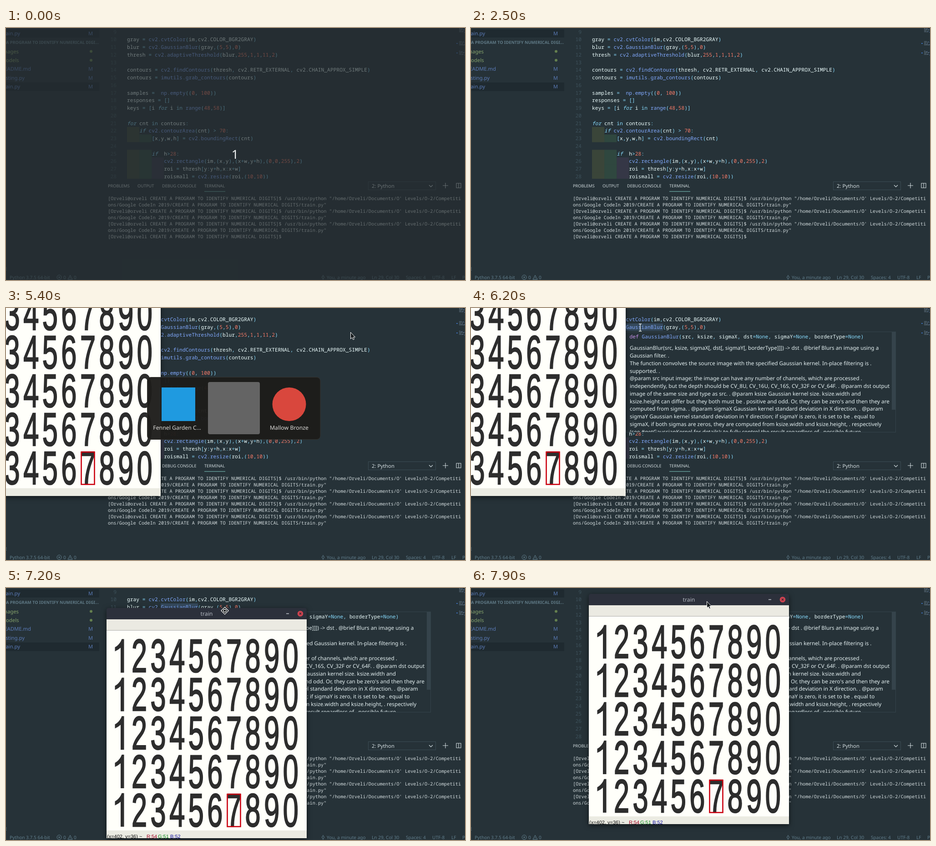
An HTML page for the animation above (8000 ms loop, 1009 by 555 pixels).

```html
<!DOCTYPE html>
<html lang="en">
<head>
<meta charset="utf-8">
<title>Digit training session</title>
<style>
html, body { margin: 0; width: 100%; height: 100%; overflow: hidden; background: #263238; }
svg { display: block; font-family: "Noto Sans", sans-serif; text-rendering: geometricPrecision; }
text { white-space: pre; }
.mono { font-family: "Noto Sans Mono", monospace; }
.arial { font-family: "Liberation Sans", Arial, sans-serif; }
#win { filter: drop-shadow(0 3px 6px rgba(0, 0, 0, .55)); }
</style>
</head>
<body>
<svg id="stage" width="1009" height="555" viewBox="0 0 1009 555"></svg>
<script>
const BG = '#263238', WHITE = '#eeffff', CYAN = '#89ddff', BLUE = '#82aaff', DIM = '#607d8b';

const text = (x, y, s, fill, size, attrs = '') =>
  `<text x="${x}" y="${y}" fill="${fill}" font-size="${size}" ${attrs}>${s}</text>`;
const rect = (x, y, w, h, fill, attrs = '') =>
  `<rect x="${x}" y="${y}" width="${w}" height="${h}" fill="${fill}" ${attrs}/>`;
const line = (d, stroke, width = 1) =>
  `<path d="${d}" fill="none" stroke="${stroke}" stroke-width="${width}"/>`;
const group = (id, content) => `<g id="${id}">${content}</g>`;
const END = 'text-anchor="end"', MID = 'text-anchor="middle"';

// Syntax colouring for one line of Python
const highlight = s => s.replace(/[\w.]+|[^\w\s.]+/g, (word, at) => {
  let fill = WHITE, style = '';
  if (/^(for|if)$/.test(word)) { fill = CYAN; style = 'font-style="italic"'; }
  else if (word === 'def') fill = '#c792ea';
  else if (/^(in|None)$/.test(word) || /^\W/.test(word)) fill = CYAN;
  else if (/^\d+$/.test(word)) fill = '#f47a68';
  else if (s[at + word.length] === '(') fill = BLUE;
  return `<tspan fill="${fill}" ${style}>${word}</tspan>`;
});
const codeText = (x, y, s) => text(x, y, highlight(s), WHITE, 11.29, 'class="mono"');

const FIRST_LINE = 9;
const source = `
gray = cv2.cvtColor(im,cv2.COLOR_BGR2GRAY)
blur = cv2.GaussianBlur(gray,(5,5),0)
thresh = cv2.adaptiveThreshold(blur,255,1,1,11,2)

contours = cv2.findContours(thresh, cv2.RETR_EXTERNAL, cv2.CHAIN_APPROX_SIMPLE)
contours = imutils.grab_contours(contours)

samples =  np.empty((0, 100))
responses = []
keys = [i for i in range(48,58)]

for cnt in contours:
    if cv2.contourArea(cnt) > 70:
        [x,y,w,h] = cv2.boundingRect(cnt)

        if  h>28:
            cv2.rectangle(im,(x,y),(x+w,y+h),(0,0,255),2)
            roi = thresh[y:y+h,x:x+w]
            roismall = cv2.resize(roi,(10,10))`.split('\n');

function editor() {
  const tints = ['rgba(255,255,64,.09)', 'rgba(127,255,127,.1)', 'rgba(255,127,255,.07)'];
  let out = group('mark', rect(340, 34, 82, 16, 'rgba(110,160,230,.2)'));
  source.forEach((s, i) => {
    const y = 12.6 + i * 16.75, levels = s.search(/\S|$/) / 4;
    for (let k = 0; k < levels; k++) out += rect(266 + k * 27.1, y - 12.4, 27.1, 16.75, tints[k]);
    out += text(243, y, FIRST_LINE + i, '#3d515b', 11.29, 'class="mono" ' + END) + codeText(266, y, s);
  });
  // Minimap
  for (const top of [0, 29, 50])
    for (let y = top; y < top + 10; y += 2) {
      const w = 3 + y * 37 % 10;
      out += rect(996, y, w, 1, 'rgba(165,190,210,.4)') + rect(998 + w, y + 1, 3, 1, 'rgba(130,170,255,.4)');
    }
  return out + rect(990, 33, 3, 2, '#3b6bb0') + rect(990, 54, 3, 2, '#3b6bb0');
}

function sidebar() {
  const blue = '#5a7ab5', green = '#84a16b';
  const entries = [['train.py', 31, 12, blue], ['images', 28, 51.5, green], ['models', 28.5, 71, green],
    ['README.md', 55, 90, blue], ['testing.py', 41, 110, blue], ['train.py', 31, 129, blue]];
  let out = rect(0, 3, 205, 18, '#1f2a30') + rect(0, 120, 205, 19, '#1f2a30') +
    text(204, 35, 'CREATE A PROGRAM TO IDENTIFY NUMERICAL DIGI...', '#607a86', 9.2, 'font-weight="700" ' + END) +
    text(2, 534, 'OUTLINE', '#607a86', 9.2, 'font-weight="700" ' + END);
  for (const [name, x, y, fill] of entries)
    out += text(x, y + 4.2, name, fill, 11.3, END) + (fill === blue
      ? text(186, y + 4.2, 'M', fill, 11, MID)
      : `<circle cx="187" cy="${y}" r="3" fill="#65804f"/>`);
  return out;
}

function panel() {
  const tabs = [['PROBLEMS', 224], ['OUTPUT', 289], ['DEBUG CONSOLE', 343], ['TERMINAL', 436]];
  const row = (i, s) => text(224, 378.7 + i * 14.1, s, '#d3dcde', 10.27, 'class="mono"');
  const prompt = '[Orveli@orveli CREATE A PROGRAM TO IDENTIFY NUMERICAL DIGITS]$ ';
  const command = `/usr/bin/python "/home/Orveli/Documents/O' Levels/O-2/Competiti`;
  const rest = 'ons/Google CodeIn 2019/CREATE A PROGRAM TO IDENTIFY NUMERICAL DIGITS/train.py"';
  const run = i => row(i, prompt + command) + row(i + 1, rest);
  return rect(206, 332, 803, 223, BG) +
    tabs.map(([s, x]) => text(x, 350.8, s, '#cfd8dc', 9.2)).join('') +
    rect(436, 359.5, 46, 1, '#80cbc4') +
    rect(796.5, 338.5, 148, 18, 'none', 'stroke="#3b4b54"') +
    text(804, 351.6, '2: Python', '#d5dfe2', 11.3) +
    line('M930 346l4 4 4-4M960 347h12M966 341v12M990 342h10v10h-10zM995 342v10', '#d5dfe2', 1.1) +
    run(0) + run(2) + run(4) + group('idle', row(6, prompt)) + group('started', run(6));
}

function statusBar() {
  const items = [['Python 3.7.5 64-bit', 8], ['0', 126], ['0', 149], ['You, a minute ago', 705],
    ['Ln 29, Col 30', 804], ['Spaces: 4', 879], ['UTF-8', 937], ['LF', 979], ['Python', 1003]];
  return items.map(([s, x]) => text(x, 553, s, DIM, 10.1)).join('') +
    line('M112 549a5 5 0 1 0 10 0a5 5 0 1 0-10 0M115 547l4 4M119 547l-4 4M141 544.5l5 9h-10zM141 548v3', DIM) +
    line('M697 544v2.5M697 551.5v3M694.5 549a2.5 2.5 0 1 0 5 0a2.5 2.5 0 1 0-5 0', DIM);
}

function tooltip() {
  const doc = `GaussianBlur(src, ksize, sigmaX[, dst[, sigmaY[, borderType]]]) -> dst . @brief Blurs an image using a
Gaussian filter. .
The function convolves the source image with the specified Gaussian kernel. In-place filtering is .
supported. .
@param src input image; the image can have any number of channels, which are processed .
independently, but the depth should be CV_8U, CV_16U, CV_16S, CV_32F or CV_64F. . @param dst output
image of the same size and type as src. . @param ksize Gaussian kernel size. ksize.width and
ksize.height can differ but they both must be . positive and odd. Or, they can be zero's and then they are
computed from sigma. . @param sigmaX Gaussian kernel standard deviation in X direction. . @param
sigmaY Gaussian kernel standard deviation in Y direction; if sigmaY is zero, it is set to be . equal to
sigmaX, if both sigmas are zeros, they are computed from ksize.width and ksize.height, . respectively
(see #getGaussianKernel for details); to fully control the result regardless of . possible future`.split('\n');
  return rect(340.5, 52.5, 593, 221, BG, 'stroke="#34434b"') + rect(925, 53, 8, 171, '#35434b') +
    codeText(348.5, 67, 'def GaussianBlur(src, ksize, sigmaX, dst=None, sigmaY=None, borderType=None)') +
    '<g clip-path="url(#tipClip)">' +
    doc.map((s, i) => text(349, 92.3 + i * 16.75, s, '#e6f2f3', 11.76)).join('') + '</g>';
}

// The picture shows Arial-like digits squeezed sideways; its "1" has no foot
function digitSheet() {
  const SQUASH = .595;
  let out = '';
  for (let r = 0; r < 5; r++) {
    const y = 141.3 + 84.8 * r;
    out += `<path transform="translate(18.5 ${y + 1.3})" d="M20 0V-74h-5C12-66 7-60 0-56v9q7-3 12.5-8V0Z"/>`;
    [...'234567890'].forEach((d, i) => {
      out += `<text transform="translate(${72 + 41.6 * i} ${y}) scale(${SQUASH} 1)">${d}</text>`;
    });
  }
  return `<g class="arial" font-size="103" ${MID} fill="#2d2d2d">` +
    out.replaceAll('<text', '<text stroke="#2d2d2d" stroke-width="2.6"') + '</g>';
}

function trainWindow() {
  const readout = [['(x=402, y=36) ~', 1, '#111'], ['R:54', 88, '#a00020'], ['G:51', 113, '#0a8a18'], ['B:52', 140, '#1212a0']];
  return '<g clip-path="url(#winClip)">' +
    rect(0, 0, 440, 507, '#2c303b') + text(220, 17.2, 'train', '#b4b9c2', 12.3, MID) +
    line('M395 12.5h6', '#c5c9d0', 1.5) +
    '<circle cx="426" cy="12.5" r="6.3" fill="#cc4350"/>' + line('M424 10.5l4 4M428 10.5l-4 4', '#3a2530', 1.3) +
    rect(0, 25, 440, 24, '#ebeae2') + rect(0, 48.5, 440, 1, '#cfcec8') +
    rect(0, 49.5, 440, 440.5, '#fffffa') + rect(0, 490, 440, 17, '#ebebe2') + digitSheet() +
    rect(265.5, 410.2, 29, 71.3, 'none', 'stroke="#cb0010" stroke-width="2.6"') +
    group('readout', readout.map(([s, x, c]) => text(x, 506.5, s, c, 11, 'class="arial"')).join('')) + '</g>';
}

function switcher() {
  return rect(310.5, 152.5, 380.5, 137, 'rgba(30,29,27,.96)', 'rx="8" stroke="#34332f"') +
    rect(444, 163, 114, 115, '#646464', 'rx="4"') +
    rect(342, 175, 74, 74, '#1f9ae0') + '<circle cx="622.5" cy="212" r="37" fill="#d9473d"/>' +
    text(376, 267.5, 'Fennel Garden C...', '#deddda', 12.3, MID) + text(622.5, 267.5, 'Mallow Bronze', '#deddda', 12.3, MID);
}

const pointers =
  group('beam', line('M-3-8h2l1 1 1-1h2M0-7V7M-3 8h2l1-1 1 1h2', '#e8eeee', 1.3)) +
  group('arrow', '<path d="M0 0V14.5L3.3 11.5 5.5 16.3 8 15.2 5.8 10.6H10Z" fill="#15191b" stroke="#fff"/>') +
  group('move', '<g fill="#15191b" stroke="#fff" stroke-width="1.2"><path d="M0-8L8 0 0 8-8 0Z"/><circle r="3.2"/></g>');

document.getElementById('stage').innerHTML =
  `<defs><clipPath id="tipClip">${rect(341, 53, 584, 220, '#000')}</clipPath>
   <clipPath id="winClip"><path d="M0 507V5q0-5 5-5H435q5 0 5 5V507Z"/></clipPath></defs>` +
  rect(0, 0, 1009, 555, BG) + editor() + sidebar() + panel() + statusBar() +
  group('tip', tooltip()) + group('win', trainWindow()) + group('switch', switcher()) + pointers +
  group('countdown', rect(0, 0, 1009, 555, 'rgba(37,43,47,.63)') + text(503.5, 288, '1', '#f2f4f4', 27, MID));

const el = id => document.getElementById(id);
const show = (id, on) => { el(id).style.display = on ? '' : 'none'; };
const place = (id, [x, y]) => el(id).setAttribute('transform', `translate(${x} ${y})`);
const at = (path, i) => path[Math.max(0, Math.min(path.length - 1, i))];

const beamIn = [[865.5, 70.5], [850, 72], [812, 69], [775, 59], [758, 54.5]];
const beamBack = [[742, 58], [640, 53], [500, 48], [405, 44], [372, 43]];
const drag = [[-100, -93], [140, -13], [190, 20], [221, 44], [238, 54], [243, 52], [248, 40], [254, 26], [258, 16], [259, 13]];

function draw(now) {
  const step = Math.floor(now % 8000 / 100);
  show('countdown', step < 1);
  show('idle', step < 27);
  show('started', step >= 27);
  show('switch', step >= 50 && step < 55);
  show('mark', step >= 62);
  show('tip', step >= 62);
  show('win', step >= 54);
  show('readout', step >= 63);

  const win = at(drag, step - 69);
  place('win', win);

  show('beam', step >= 34 && step < 48 || step >= 55 && step < 63);
  place('beam', step < 48 ? at(beamIn, step - 35) : at(beamBack, step - 55));
  show('arrow', step >= 48 && step < 55 || step === 79);
  place('arrow', step < 55 ? [757.5, 53.5] : [518.5, 29.5]);
  show('move', step >= 71 && step < 79);
  place('move', [win[0] + 260, win[1] + (step < 75 ? 6 : Math.min(17, 6 + (step - 74) * 3))]);
  requestAnimationFrame(draw);
}
draw(0);
</script>
</body>
</html>
```
